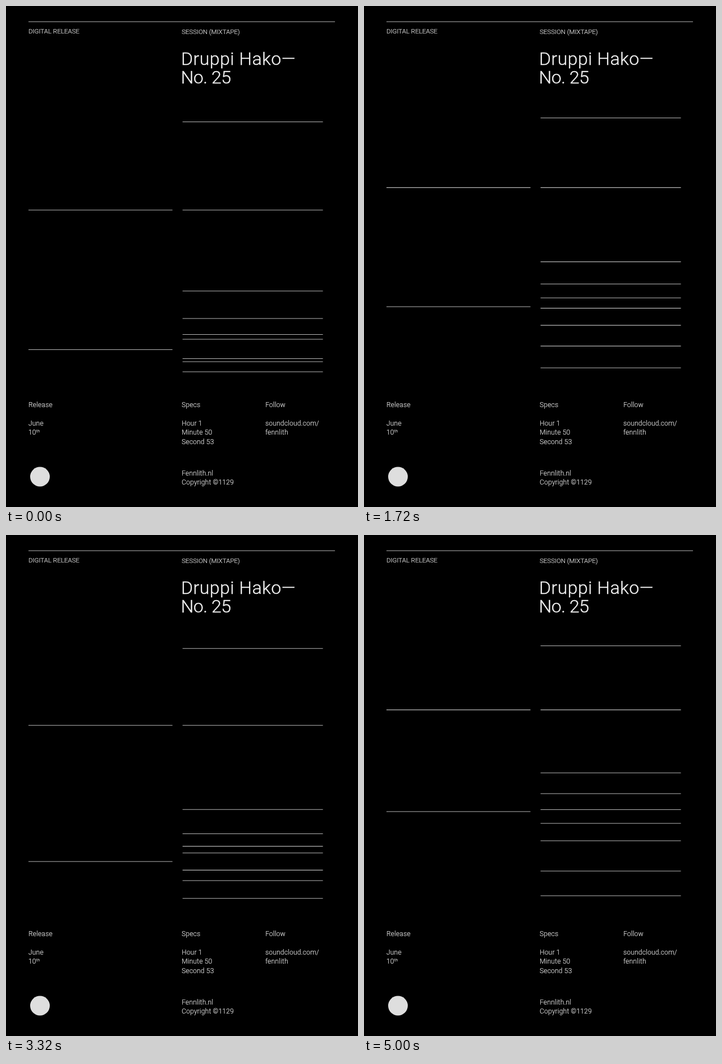
Recreate the animation shown at these times as an HTML page. Size 627 px wide and 893 px high, loop 5.04 s.

```html
<!DOCTYPE html>
<html lang="en">
<head>
<meta charset="utf-8">
<title>Session poster</title>
<style>
  html, body { margin: 0; width: 100%; height: 100%; overflow: hidden; background: #000; }
  svg { display: block; width: 627px; height: 893px; }
  text { font: 300 12px Roboto, sans-serif; letter-spacing: .2px; fill: #dedede; stroke: #dedede; stroke-width: .2; }
  .caps { font-size: 11.5px; letter-spacing: 0; }
  .title { font-size: 32px; letter-spacing: .5px; fill: #f2f2f2; stroke: #f2f2f2; stroke-width: .4; }
  .number { letter-spacing: -.4px; }
  .sup { font-size: 7px; }
  line { stroke: #b8b8b8; stroke-width: 1.1; }
</style>
</head>
<body>
<svg viewBox="0 0 627 893">
  <rect width="627" height="893" fill="#000"/>
  <line x1="40" x2="586" y1="28" y2="28"/>
  <text class="caps" x="40" y="48.5">DIGITAL RELEASE</text>
  <text class="caps" x="313" y="49.5">SESSION (MIXTAPE)</text>
  <text class="title" x="312" y="104.5">Druppi Hako—</text>
  <text class="title number" x="311.5" y="138">No. 25</text>
  <g id="lines"></g>
  <text x="40" y="714.5">Release</text>
  <text x="40" y="747.5">June</text>
  <text x="40" y="764">10<tspan class="sup" dy="-4">th</tspan></text>
  <text x="313" y="714.5">Specs</text>
  <text x="313" y="747.5">Hour 1</text>
  <text x="313" y="764">Minute 50</text>
  <text x="313" y="780.5">Second 53</text>
  <text x="462" y="714.5">Follow</text>
  <text x="462" y="747.5">soundcloud.com/</text>
  <text x="462" y="764">fennlith</text>
  <circle cx="60.5" cy="839" r="17.5" fill="#dedede"/>
  <text x="313" y="836.5">Fennlith.nl</text>
  <text x="313" y="853">Copyright ©1129</text>
</svg>
<script>
const LOOP = 5040, STEP = 40;
const LEFT = [40, 296.5], RIGHT = [314.5, 564.5];
const group = document.getElementById("lines");

// A line rests at `rest` and sinks by up to `drop`;
// `mix` blends the upper sway (0) with the lower one (1)
function addLine([x1, x2], rest, drop, mix) {
  const el = document.createElementNS("http://www.w3.org/2000/svg", "line");
  el.setAttribute("x1", x1);
  el.setAttribute("x2", x2);
  group.append(el);
  return { el, rest, drop, mix };
}

const lines = [
  addLine(LEFT, 311.6, 52.2, 0),
  addLine(LEFT, 493, 119.5, 1),
  addLine(RIGHT, 197.5, 9, 0),
  addLine(RIGHT, 311.6, 52.2, 0),
  addLine(RIGHT, 424, 84, 1.15),
  addLine(RIGHT, 461, 96, 1),
  addLine(RIGHT, 489.5, 96, .7),
  addLine(RIGHT, 514, 80, .6),
  addLine(RIGHT, 545, 83.5, .45),
  addLine(RIGHT, 599, 35, -.2),
  addLine(RIGHT, 643, 9, 0)
];

// Turning points of the sway: time, upper, lower
const turns = [
  [0, 1, 1], [560, .81, .91], [1000, .49, .655], [1720, .23, .36],
  [1960, -.05, .08], [2200, .45, .58], [2360, .365, .495],
  [3080, .89, 1], [3320, .53, .745], [3560, .66, .82],
  [4160, .23, .208], [5000, 0, 0]
];

function swayAt(t) {
  const i = Math.max(1, turns.findIndex(p => p[0] >= t));
  const a = turns[i - 1], b = turns[i];
  const k = (t - a[0]) / (b[0] - a[0]);
  return a.map((v, j) => v + (b[j] - v) * k);
}

function draw(ms) {
  const t = Math.floor((ms % LOOP) / STEP) * STEP;
  const [, upper, lower] = swayAt(t);
  for (const { el, rest, drop, mix } of lines) {
    const y = rest + drop * (upper + (lower - upper) * mix);
    el.setAttribute("y1", y);
    el.setAttribute("y2", y);
  }
}

const start = performance.now();
function tick() {
  draw(performance.now() - start);
  requestAnimationFrame(tick);
}
tick();
</script>
</body>
</html>
```
